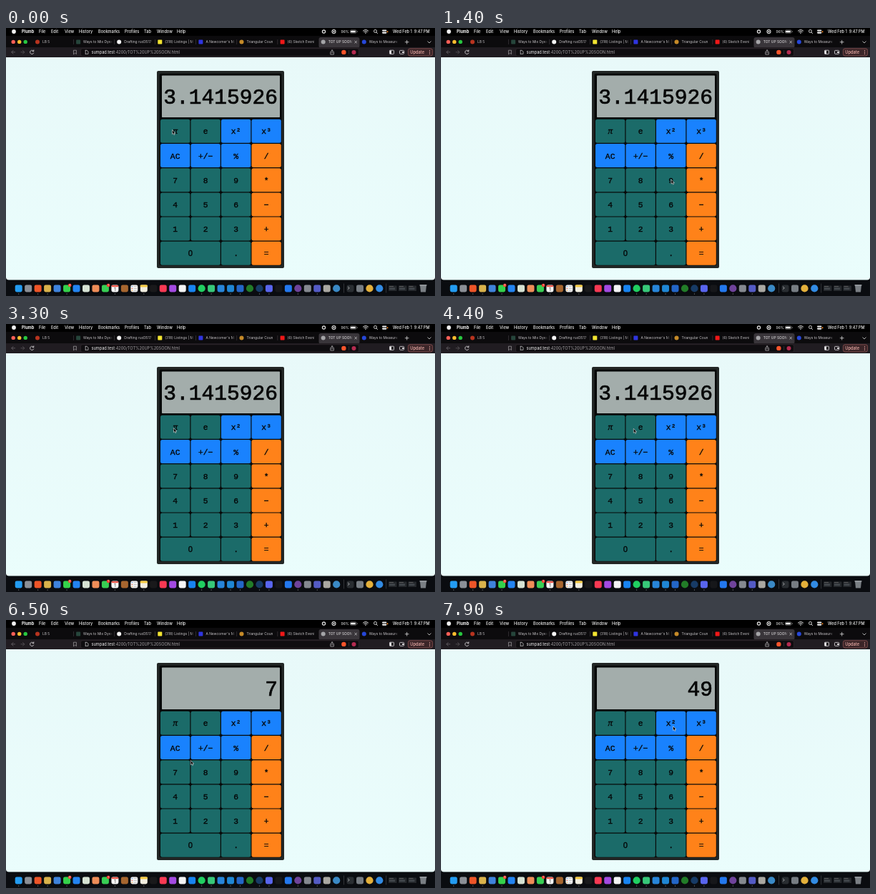
Write an HTML page that moves like this. It is 600 by 375 pixels and loops after 8 s.

```html
<!DOCTYPE html>
<html lang="en">
<head>
<meta charset="utf-8">
<title>Calculator</title>
<style>
html, body { margin: 0; width: 100%; height: 100%; overflow: hidden; background: #000; }
svg { display: block; width: 100vw; height: 100vh; }
text { font-family: Inter, "Open Sans", sans-serif; white-space: pre; }
.key { font-family: "Liberation Mono", "Courier New", monospace; font-size: 11.3px; stroke: #050708; stroke-width: .35px; }
.pi { font-family: "Liberation Serif", "Noto Serif", serif; font-style: italic; font-size: 13px; }
.zero { font-family: "Liberation Sans", Arial, sans-serif; }
.readout { font-family: "Liberation Mono", "Courier New", monospace; font-size: 29.6px; stroke: #060707; stroke-width: .7px; }
</style>
</head>
<body>
<svg id="stage" viewBox="0 0 600 375" preserveAspectRatio="none">
  <defs>
    <linearGradient id="page" x2="0" y2="1">
      <stop stop-color="#e8f9f9"/><stop offset="1" stop-color="#eafdfc"/>
    </linearGradient>
    <linearGradient id="fade">
      <stop stop-color="#0c0b0d" stop-opacity="0"/><stop offset=".7" stop-color="#0c0b0d"/>
    </linearGradient>
    <linearGradient id="fadeActive">
      <stop stop-color="#39353a" stop-opacity="0"/><stop offset=".7" stop-color="#39353a"/>
    </linearGradient>
  </defs>
</svg>
<script>
const stage = document.getElementById("stage");

function add(tag, attrs, content) {
  const el = document.createElementNS("http://www.w3.org/2000/svg", tag);
  for (const name in attrs) el.setAttribute(name, attrs[name]);
  if (content !== undefined) el.textContent = content;
  return stage.appendChild(el);
}
const rect = (x, y, width, height, fill, rx = 0, more) => add("rect", { x, y, width, height, fill, rx, ...more });
const dot = (cx, cy, r, fill) => add("circle", { cx, cy, r, fill });
const line = (d, stroke = "#d8d6d8", width = .8) =>
  add("path", { d, stroke, "stroke-width": width, fill: "none", "stroke-linecap": "round", "stroke-linejoin": "round" });
const label = (x, y, size, fill, content, more) => add("text", { x, y, "font-size": size, fill, ...more }, content);

function drawMenuBar() {
  rect(0, 0, 600, 11, "#000");
  dot(11, 5, 2.9, "#f2f2f2");
  label(22, 7.1, 5.6, "#fff", "Plumb", { "font-weight": 700 });
  const items = { File: 46, Edit: 63, View: 82, History: 102, Bookmarks: 129, Profiles: 166, Tab: 193, Window: 211, Help: 239 };
  for (const name in items) label(items[name], 7.1, 5.6, "#f2f2f2", name, { "font-weight": 500 });

  dot(444.5, 5, 2.7, "#e8e8e8");
  dot(444.5, 5, 1.6, "#111");
  dot(458.5, 5, 3, "#f4f4f4");
  dot(458.5, 5, 2, "#000");
  dot(458.5, 5, 1.1, "#f4f4f4");
  label(468.5, 7, 5.1, "#f2f2f2", "96%");
  rect(481.5, 2.9, 8.5, 4.2, "none", 1.2, { stroke: "#aaa", "stroke-width": .6 });
  rect(482.3, 3.7, 6.4, 2.6, "#fff", .6);
  rect(490.8, 4.2, .7, 1.6, "#aaa");
  line("M499.5 3.9Q503 1 506.5 3.9M500.8 5.4Q503 3.6 505.2 5.4", "#fff", .9);
  dot(503, 7, .8, "#fff");
  add("circle", { cx: 516.5, cy: 4.4, r: 2, fill: "none", stroke: "#fff", "stroke-width": .8 });
  line("M518 6L519.6 7.6", "#fff");
  rect(526, 2.4, 6.4, 2.2, "#eee", 1.1);
  rect(526, 5.5, 6.4, 2.2, "#eee", 1.1);
  dot(533.5, 5.2, 1, "#ff8b22");
  label(541, 7.1, 5.5, "#f2f2f2", "Wed Feb 1  9:47 PM", { "font-weight": 500 });
}

function drawTabs() {
  rect(0, 11, 600, 16.5, "#0c0b0d");
  ["#ff5f57", "#febc2e", "#28c840"].forEach((fill, i) => dot(10.2 + i * 8.5, 19.4, 2.7, fill));
  const tabs = [
    ["LB 5", "#b8341f", 1],
    ["Ways to Mix Dyes", "#26453b", 0],
    ["Drafting rud3517", "#f4f4f4", 1],
    ["(318) Listings | M", "#f3e531", 0],
    ["A Newcomer's Ma", "#2f35e0", 0],
    ["Triangular Coun", "#c58a28", 1],
    ["(6) Sketch Eveni", "#f01818", 0],
    ["TOT UP SOON", "#a5a5a8", 1],
    ["Ways to Measure", "#2647d8", 1]
  ];
  tabs.forEach(([title, fill, round], i) => {
    const x = 44 + i * 57.1;
    const active = i === 7;
    if (active) rect(437.5, 13, 57, 15, "#39353a", 3);
    else if (i && i !== 8) rect(x - 7, 16, .6, 7, "#454146");
    if (round) dot(x, 19.6, 3, fill);
    else rect(x - 3, 16.6, 6, 6, fill, .8);
    label(x + 7, 21.4, 4.9, active ? "#f1eff1" : "#c6c3c6", title);
    rect(x + (active ? 37 : 43), 15, active ? 6 : 7, 10, `url(#${active ? "fadeActive" : "fade"})`);
  });
  line("M487.8 18.2L490.6 21M490.6 18.2L487.8 21", "#ddd", .7);
  line("M558.3 19.7H563.1M560.7 17.3V22.1", "#ddd", .8);
  line("M589.8 18.8L592 21L594.2 18.8", "#ddd", .8);
}

function drawToolbar() {
  rect(0, 27, 600, 14, "#201c21");
  line("M12.5 33.8H8M10 31.5L7.7 33.8L10 36.1", "#6b676b");
  line("M21 33.8H25.5M23.5 31.5L25.8 33.8L23.5 36.1", "#5b575b");
  line("M38.5 32.2A2.7 2.7 0 1 0 38.8 35M38.8 30.8V32.7H36.9", "#e0dee0");
  line("M94.8 31.2H98.4V36.6L96.6 35L94.8 36.6Z", "#aaa6aa", .7);
  rect(104.5, 28.7, 389, 10.8, "#0f0d10", 2.5, { stroke: "#3d3337", "stroke-width": .5 });
  line("M111.2 31.3V36.3M111.2 31.3H113.2L115 33V36.3H111.2", "#d0ced0", .7);
  const url = label(119.5, 36.1, 5.6, "#a9a5a9", "");
  url.innerHTML = '<tspan fill="#f2f0f2">sumpad.test</tspan>:4200/TOT%20UP%20SOON.html';
  line("M454.6 33.4H453.8V37H458.4V33.4H457.6M456.1 35V30.7M454.8 32L456.1 30.7L457.4 32", "#c8c5c8", .7);
  dot(472.4, 33.9, 3.2, "#fb542b");
  rect(479.5, 31, .6, 6, "#4a4549");
  dot(486.5, 33.9, 3, "#b52b50");
  rect(536.5, 31.2, 6, 5.2, "none", .7, { stroke: "#e6e4e6", "stroke-width": .8 });
  rect(536.8, 31.5, 2.2, 4.6, "#e6e4e6");
  rect(550.5, 31.4, 6.2, 4.9, "none", 1, { stroke: "#e6e4e6", "stroke-width": .8 });
  rect(554, 33, 2.7, 1.8, "#e6e4e6");
  rect(562.4, 28.8, 34.2, 10.2, "#3b2528", 2.6, { stroke: "#a9625f", "stroke-width": .6 });
  label(565.3, 36, 5.7, "#f4b3ac", "Update", { "font-weight": 500 });
  [31.6, 33.9, 36.2].forEach(y => dot(592.5, y, .65, "#f4b3ac"));
}

function drawPage() {
  rect(0, 41, 600, 334, "#0a0c10");
  add("path", { d: "M0 41H600V348.5Q600 352.5 596 352.5H4Q0 352.5 0 348.5Z", fill: "url(#page)" });
}

function drawDock() {
  const colors = ("#239cf2 #8b8f96 #ee5528 #d9b24b #3f83dc #35d24b #2384f1 #d6e2d3 #ef8d58 #38ce54 " +
    "#f7f7f7 #a7662f #f3f3f3 #f2eee0 #19191b #f83953 #a34ae2 #f4f4f5 #1884f2 #20cf61 #37c879 #2785d9 " +
    "#1f86d4 #2366c7 #227c28 #173b66 #5965ee #16171a #2378ee #6f439b #858990 #545bc5 #aaa8a2 #3a89c5").split(" ");
  const discs = [19, 24, 25, 29, 33];
  const running = [0, 2, 3, 5, 10, 13, 19, 20, 22, 23, 25, 26, 29, 31];
  const icon = (x, fill, round) => round
    ? dot(x, 364.4, 5.1, fill)
    : rect(x - 5, 359.4, 10, 10, fill, 2.3);
  const badge = (x, count) => {
    dot(x + 4.2, 360, 2.3, "#ff3b30");
    label(x + 4.2, 361.3, 3.5, "#fff", count, { "text-anchor": "middle" });
  };
  colors.forEach((fill, i) => {
    const x = 17.7 + i * 13.47;
    icon(x, fill, discs.includes(i));
    if (running.includes(i)) dot(x, 372, .6, "#aaa");
  });
  badge(85, "3");
  badge(138.9, "1");
  rect(147.5, 360, 9.8, 2.3, "#ee5548", 1);
  label(152.4, 368.2, 6, "#333", "1", { "text-anchor": "middle" });
  [361.6, 364.4, 367.2].forEach((y, i) => {
    dot(176.4, y, .7, ["#3181ef", "#ee5039", "#f0a32c"][i]);
    rect(178.4, y - .3, 5, .6, "#aaa");
  });
  rect(187.7, 359.4, 10.2, 3.2, "#f6ca42", 1);
  rect(472, 357.5, .6, 13, "#4a4d50");
  icon(481.5, "#292d31", false);
  line("M478.3 362.2L480.3 363.8L478.3 365.4", "#ddd", .6);
  icon(495, "#777d83", false);
  icon(508.5, "#e4b03b", true);
  icon(522.3, "#328be3", true);
  rect(531.5, 357.5, .6, 13, "#4a4d50");
  for (const x of [535, 549, 562.5]) {
    rect(x, 360.4, 11.5, 7.7, "#25282c", .7);
    rect(x + 1, 361.4, 6, .7, "#777");
    rect(x + 1, 363.5, 8, 2.6, "#42474c");
  }
  add("path", { d: "M579 360H588L587 369.5H580Z", fill: "#7a7f84" });
  rect(578.4, 359.2, 10.2, 1.3, "#b1b6ba", .6);
}

const TEAL = "#1b6b69", BLUE = "#1982fe", ORANGE = "#ff8219";
const keyFonts = { "π": "pi", "0": "zero" };
const glow = {};
let readout;

function drawKey(name, col, row, fill, span = 1) {
  const x = 216 + col * 42.5, y = 127.8 + row * 34.2;
  const w = 41.3 + (span - 1) * 42.5, h = 33;
  rect(x, y, w, h, fill, 2.5);
  glow[name] = rect(x, y, w, h, "#e8e4d0", 2.5, { opacity: 0 });
  label(x + w / 2, y + 20.6, 11.3, "#050708", name,
    { class: `key ${keyFonts[name] || ""}`, "text-anchor": "middle" });
}

function drawCalculator() {
  rect(211, 60, 178, 276, "#222625", 2);
  rect(214.7, 63.7, 170.8, 268.6, "#070909", 2);
  rect(218, 66.5, 165, 58.5, "#a3adab", .8);
  readout = label(380, 106.4, 29.6, "#060707", "", { class: "readout", "text-anchor": "end" });
  const rows = ["π e x² x³", "AC +/− % /", "7 8 9 *", "4 5 6 −", "1 2 3 +"];
  rows.forEach((names, row) => names.split(" ").forEach((name, col) => {
    const blue = row === 1 || (row === 0 && col > 1);
    drawKey(name, col, row, row && col === 3 ? ORANGE : blue ? BLUE : TEAL);
  }));
  drawKey("0", 0, 5, TEAL, 2);
  drawKey(".", 2, 5, TEAL);
  drawKey("=", 3, 5, ORANGE);
}

drawMenuBar();
drawTabs();
drawToolbar();
drawPage();
drawCalculator();
drawDock();
const pointer = add("path", {
  d: "M0 0V6.1L1.4 4.9L2.4 7L3.5 6.5L2.5 4.5H4.4Z",
  fill: "#050505", stroke: "#f4f4f4", "stroke-width": .55, "stroke-linejoin": "round"
});

const LOOP = 8000, STEP = 100, PRESS = 200;
// time, x, y
const path = [
  [0, 232.5, 142.5], [300, 232.5, 142.5], [800, 373, 219.5], [900, 373.2, 220.5], [1100, 373.2, 220.5],
  [1400, 322, 212], [1600, 322, 212], [1900, 364.8, 318], [2100, 365.2, 319.2], [2300, 365.2, 319.2],
  [2900, 235, 146], [3300, 234.5, 145.5], [4000, 234.5, 145.5], [4500, 278, 146.5], [4900, 278, 146.5],
  [5400, 258, 174.5], [5800, 237, 213], [6200, 237, 213], [6500, 258.3, 196.5], [6900, 324.5, 148.5],
  [LOOP, 324.5, 148.5]
];
// time, key, readout
const presses = [
  [-PRESS, "π", "3.1415926"], [900, "*", "3.1415926"], [1500, "9", "9"], [1900, "=", "28.274333"],
  [3000, "π", "3.1415926"], [4600, "e", "2.7182818"], [6000, "7", "7"], [7000, "x²", "49"]
];

function draw(t) {
  const i = path.findIndex(p => p[0] > t);
  const [t0, x0, y0] = path[i - 1], [t1, x1, y1] = path[i];
  const k = (t - t0) / (t1 - t0);
  pointer.setAttribute("transform", `translate(${x0 + (x1 - x0) * k} ${y0 + (y1 - y0) * k})`);

  const [start, key, value] = presses.filter(p => p[0] <= t).pop();
  readout.textContent = value;
  for (const name in glow) glow[name].setAttribute("opacity", 0);
  if (t - start < PRESS) glow[key].setAttribute("opacity", .48);
}

const origin = performance.now();
function tick() {
  const t = (performance.now() - origin) % LOOP;
  draw(Math.floor(t / STEP) * STEP);
  requestAnimationFrame(tick);
}
tick();
</script>
</body>
</html>
```
